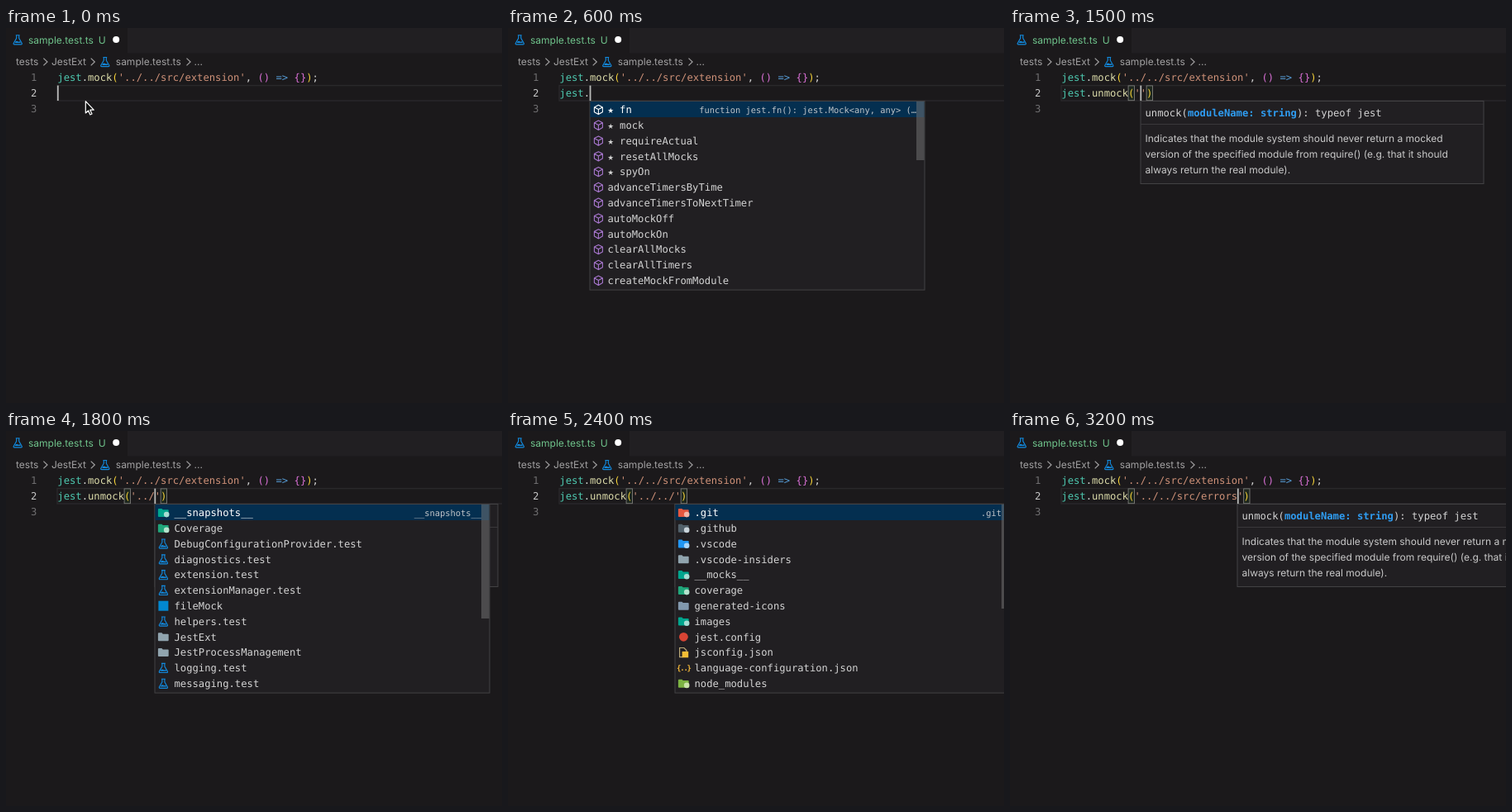
Recreate the animation shown at these times as an HTML page. Size 600 px wide and 454 px high, loop 3.3 s.

```html
<!DOCTYPE html>
<html lang="en">
<head>
<meta charset="utf-8">
<title>Editor completion</title>
<style>
  html, body { margin: 0; width: 100%; height: 100%; overflow: hidden; background: #1b191b; }
  svg { display: block; }
  text { white-space: pre; text-rendering: geometricPrecision; }
  .code { font: 12.2px "DejaVu Sans Mono", monospace; fill: #d4d4d4; }
  .detail { font: 10.4px "DejaVu Sans Mono", monospace; fill: #c0c4c8; text-anchor: end; }
  .ui { font: 12px Inter, sans-serif; fill: #a2a1a2; }
  .doc { fill: #c8c8c8; }
  .num { fill: #6f6e70; text-anchor: end; }
  .on { fill: #c6c6c6; }
  .hit { fill: #2f9df2; font-weight: bold; }
  .box { fill: #211f22; stroke: #434244; }
  .match { fill: #1d261d; stroke: #7d7d7b; stroke-width: .9; }
  .line { fill: none; stroke: #a2a1a2; stroke-width: 1.2; }
</style>
</head>
<body>
<svg id="stage" width="600" height="454" viewBox="0 0 600 454"></svg>
<script>
const LOOP = 3300, STEP = 100;
const LEFT = 62.3, CHAR = 7.345, ROW = 18.8;

// "icon:label"; without an icon the entry is a method. Stars enclose matched letters.
const lists = {
  all: {
    thumb: 71, detail: 'function jest.fn(): jest.Mock<any, any> (…',
    items: ['★ fn', '★ mock', '★ requireActual', '★ resetAllMocks', '★ spyOn',
      'advanceTimersByTime', 'advanceTimersToNextTimer', 'autoMockOff', 'autoMockOn',
      'clearAllMocks', 'clearAllTimers', 'createMockFromModule']
  },
  u: {
    detail: 'function jest.unmock(moduleName: string):…',
    items: ['*u*nmock', '*u*seFakeTimers', '*u*seRealTimers', 'a*u*toMockOff', 'a*u*toMockOn',
      'deep*U*nmock', 'disableA*u*tomock', 'enableA*u*tomock', '★ req*u*ireActual',
      'createMockFromMod*u*le', 'isolateMod*u*les', 'resetMod*u*les']
  },
  unm: {
    detail: 'function jest.unmock(moduleName: string):…',
    items: ['*unm*ock', 'deep*Unm*ock', 'enableAutomock']
  },
  unmoc: {
    detail: 'function jest.unmock(moduleName: string):…',
    items: ['*unmoc*k', 'deep*Unmoc*k', 'enableAutomock']
  },
  unmock: {
    detail: 'function jest.unmock(moduleName: string):…',
    items: ['*unmock*', 'deep*Unmock*', 'enableAutomock']
  },
  tests: {
    thumb: 138, detail: '__snapshots__',
    items: ['teal:__snapshots__', 'green:Coverage', 'flask:DebugConfigurationProvider.test',
      'flask:diagnostics.test', 'flask:extension.test', 'flask:extensionManager.test',
      'ts:fileMock', 'flask:helpers.test', 'folder:JestExt', 'folder:JestProcessManagement',
      'flask:logging.test', 'flask:messaging.test']
  },
  root: {
    thumb: 126, detail: '.git',
    items: ['git:.git', 'hub:.github', 'blue:.vscode', 'folder:.vscode-insiders',
      'teal:__mocks__', 'green:coverage', 'slate:generated-icons', 'teal:images',
      'red:jest.config', 'js:jsconfig.json', 'braces:language-configuration.json',
      'leaf:node_modules']
  },
  s: { detail: 'src', items: ['green:*s*rc', 'folder:*s*yntaxes', 'teal:__mock*s*__',
    'slate:generated-icon*s*', 'teal:image*s*', 'js:j*s*config.json', 'leaf:node_module*s*'] },
  sr: { detail: 'src', items: ['green:*sr*c'] },
  src: { detail: 'src', items: ['green:*src*'] },
  source: {
    thumb: 150, detail: 'Coverage',
    items: ['green:Coverage', 'ts:DebugConfigurationProvider', 'ts:diagnostics', 'ts:errors',
      'ts:extension', 'ts:extensionManager', 'ts:helpers', 'folder:JestExt',
      'folder:JestProcessManagement', 'ts:logging', 'ts:messaging', 'ts:types']
  },
  e: { detail: 'errors', items: ['ts:*e*rrors', 'ts:*e*xtension', 'ts:*e*xtensionManager'] },
  err: { detail: 'errors', items: ['ts:*err*ors'] }
};

// [step, line with | as the caret, open list]
const scenes = [
  [0, '|'], [3, 'j|'], [4, 'je|'], [5, 'jest|'], [6, 'jest.|', 'all'], [8, 'jest.u|', 'u'],
  [9, 'jest.unm|', 'unm'], [10, 'jest.unmoc|', 'unmoc'], [11, 'jest.unmock|', 'unmock'],
  [13, 'jest.unmock(|)'], [15, "jest.unmock('|')"], [16, "jest.unmock('.|')"],
  [17, "jest.unmock('..|')"], [18, "jest.unmock('../|')", 'tests'],
  [20, "jest.unmock('../.|')"], [21, "jest.unmock('../..|')"], [22, "jest.unmock('../../|')"],
  [23, "jest.unmock('../../|')", 'root'], [26, "jest.unmock('../../s|')", 's'],
  [27, "jest.unmock('../../sr|')", 'sr'], [28, "jest.unmock('../../src|')", 'src'],
  [29, "jest.unmock('../../src/|')", 'source'], [30, "jest.unmock('../../src/e|')", 'e'],
  [31, "jest.unmock('../../src/err|')", 'err'], [32, "jest.unmock('../../src/errors|')"]
];

const esc = s => s.replace(/&/g, '&amp;').replace(/</g, '&lt;').replace(/>/g, '&gt;');
const text = (x, y, cls, body, extra = '') => `<text x="${x}" y="${y}" class="${cls}" ${extra}>${body}</text>`;
const rect = (x, y, w, h, attrs) => `<rect x="${x}" y="${y}" width="${w}" height="${h}" ${attrs}/>`;
const path = (d, attrs) => `<path d="${d}" ${attrs}/>`;
const circle = (x, y, r, fill) => `<circle cx="${x}" cy="${y}" r="${r}" fill="${fill}"/>`;
const at = (x, y, body) => `<g transform="translate(${x} ${y})">${body}</g>`;

const flask = path('M-2.4-5.5H2.4M-1.5-5.5V-1.8L-5 4.2Q-5.5 5.6-4.1 5.6H4.1Q5.5 5.6 5 4.2L1.5-1.8V-5.5',
    'fill="none" stroke="#128ade" stroke-width="1.15"')
  + path('M-2.8 2.2Q-1.2 1 0 2T2.8 1.9L3.6 3.9H-3.6Z', 'fill="#128ade"');

const cube = stroke => path('M0-5.6L5-3V2.8L0 5.7L-5 2.8V-3ZM-5-3L0-.3L5-3M0-.3V5.7',
  `fill="none" stroke="${stroke}" stroke-width="1.1" stroke-linejoin="round"`);

const folder = (fill, badge) => path('M-6.5-4Q-6.5-5-5.5-5H-2L-.6-3.6H5.5Q6.3-3.6 6.3-2.8V4Q6.3 5 5.3 5H-5.5Q-6.5 5-6.5 4Z',
  `fill="${fill}"`) + (badge ? circle(3.8, 2.2, 3.3, badge) : '');

const icons = {
  flask,
  folder: folder('#90a4ae'),
  slate: folder('#8298ad'),
  teal: folder('#00a58d', '#a5ddd3'),
  green: folder('#20a67a', '#b5e3cd'),
  git: folder('#e5573f', '#f3b5a7'),
  hub: folder('#52616b', '#c9d3da'),
  blue: folder('#2196f3', '#a9d5fa'),
  leaf: folder('#7cb342', '#c9e3a7'),
  ts: rect(-6, -6, 12, 12, 'fill="#0288d1"'),
  red: circle(0, 0, 5.4, '#d84434'),
  js: path('M3.5-1V-2.5L.5-5.6H-4.8V5.6H-1', 'fill="none" stroke="#b9a878" stroke-width="1.2"')
    + rect(-1.8, -1.2, 7.6, 7.4, 'fill="#f3bd35"'),
  braces: text(0, 3.4, 'code', '{..}', 'text-anchor="middle" style="font-size:9px;font-weight:bold;fill:#f5b93a;letter-spacing:-1.2px"')
};

function highlight(line) {
  let depth = 0;
  return line.replace(/'[^']*'|=>|[(){}]|\w+(?=\()|\w+|[^\w]/g, (tok, pos) => {
    let color = '#d4d4d4';
    if (tok[0] === "'") color = '#ce9178';
    else if (tok === '=>') color = '#569cd6';
    else if (/[({]/.test(tok)) color = depth++ ? '#da70d6' : '#f5d23a';
    else if (/[)}]/.test(tok)) color = --depth ? '#da70d6' : '#f5d23a';
    else if (tok === 'jest') color = '#4ec9b0';
    else if (/\w/.test(tok)) color = line[pos + tok.length] === '(' ? '#dcdcaa' : '#9cdcfe';
    return `<tspan fill="${color}">${esc(tok)}</tspan>`;
  });
}

function header(error) {
  const edge = error ? 158.5 : 147;
  const tint = `style="fill:${error ? '#e2705c' : '#6fc38b'}"`;
  const chevron = x => path(`M${x - 2.3} 36.6L${x + 2.3} 41L${x - 2.3} 45.4`, 'class="line"');
  return rect(edge, 0, 600 - edge, 30.5, 'fill="#211f22"')
    + at(14.2, 14.2, flask)
    + text(27, 18.5, 'ui', 'sample.test.ts', tint)
    + text(111.8, 18.5, 'ui', error ? '1, U' : 'U', tint)
    + circle(error ? 144.7 : 133.2, 14, 4, '#fff')
    + text(12, 45.3, 'ui', 'tests') + chevron(47.7)
    + text(55, 45.3, 'ui', 'JestExt') + chevron(105)
    + at(119.8, 41, flask)
    + text(132.8, 45.3, 'ui', 'sample.test.ts') + chevron(220.8)
    + text(227.5, 45.3, 'ui', '...');
}

function hint(x) {
  const tx = x + 5.5;
  const docs = ['Indicates that the module system should never return a mocked',
    'version of the specified module from require() (e.g. that it should',
    'always return the real module).'];
  return rect(x, 88.5, 415, 100, 'class="box"')
    + path(`M${x} 116.5h415`, 'stroke="#3a383b"')
    + text(tx, 107, 'code', 'unmock(<tspan class="hit">moduleName: string</tspan>): typeof jest')
    + docs.map((d, i) => text(tx, 138.3 + i * 18.75, 'ui doc', d)).join('');
}

function popup(x, { items, detail, thumb }) {
  const h = items.length * ROW + 3;
  let out = rect(x, 88.5, 405, h, 'class="box"')
    + rect(x + .5, 89, 404, ROW + .2, 'fill="#042f50"');
  items.forEach((item, i) => {
    const y = 98.9 + i * ROW;
    const [kind, label] = item.includes(':') ? item.split(':') : ['', item];
    const body = label.replace(/\*(.+?)\*/g, '<tspan class="hit">$1</tspan>');
    out += at(x + 10.4, y, kind ? icons[kind] : cube(i ? '#a877cf' : '#fff'))
      + text(x + (kind ? 23.5 : 21.4), y + 4.2, 'code', body, i ? '' : 'style="fill:#fff"');
  });
  out += text(x + 395, 102.5, 'detail', esc(detail));
  if (thumb) out += rect(x + 395, 89, 9.5, thumb, 'fill="#797979" fill-opacity=".5"');
  return out;
}

function draw(step) {
  const [, marked, list] = scenes.filter(s => s[0] <= step).pop();
  const line = marked.replace('|', '');
  const cx = LEFT + marked.indexOf('|') * CHAR;
  const boxX = Math.round(cx);
  const call = line.includes('(');
  const error = step >= 7 && step < 14;
  const caret = !(step === 1 || step === 2 || step === 24);
  const bracket = col => rect(LEFT + col * CHAR, 69.9, CHAR, 17.8, 'class="match"');

  let out = header(error)
    + rect(62, 69.6, 540, 18.4, 'fill="none" stroke="#2a292b" stroke-width="1.4"');
  if (call) out += bracket(11) + bracket(line.length - 1);
  [1, 2, 3].forEach(n => {
    out += text(37.4, 45.7 + n * 18.75, n === 2 ? 'code num on' : 'code num', n);
  });
  out += text(LEFT, 64.4, 'code', highlight("jest.mock('../../src/extension', () => {});"))
    + text(LEFT, 83.2, 'code', highlight(line));
  if (error && !call) out += path(`M${cx - 3} 87l2-2.2 2 2.2 2-2.2 2 2.2`, 'fill="none" stroke="#f14c4c"');
  if (caret) out += rect(cx - .4, 69.6, 1.8, 18.4, 'fill="#b9bab8"');
  if (call && step >= 14) out += hint(boxX);
  if (list) out += popup(boxX, lists[list]);
  if (step < 3) out += path('M96.3 88.6V103L99.6 100L101.8 105L104 104L101.8 99.2H106.2Z',
    'fill="#111" stroke="#fff" stroke-width="1.2" stroke-linejoin="round"');
  return out;
}

const stage = document.getElementById('stage');
let shown = -1;
function tick() {
  const step = Math.floor(performance.now() % LOOP / STEP);
  if (step !== shown) stage.innerHTML = draw(shown = step);
  requestAnimationFrame(tick);
}
tick();
</script>
</body>
</html>
```
